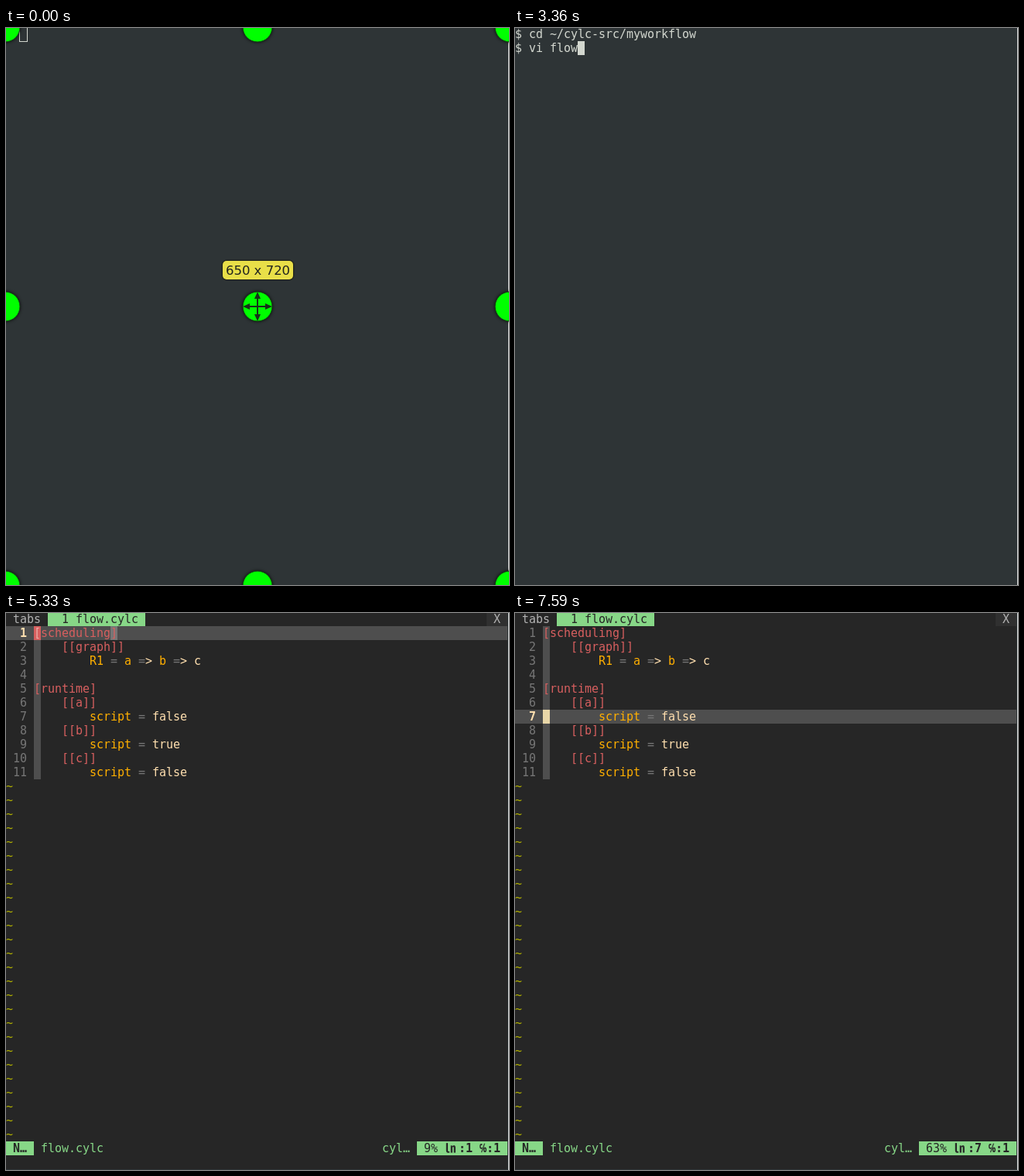
Write an HTML page with a canvas that moves like this. It is 650 px wide and 720 px high and loops after 8 s.

```html
<!DOCTYPE html>
<html>
<head>
<meta charset="utf-8">
<style>
html, body { margin: 0; width: 100%; height: 100%; overflow: hidden; background: #2e3436; }
canvas { display: block; }
</style>
</head>
<body>
<canvas id="stage" width="650" height="720"></canvas>
<script>
const ctx = document.getElementById('stage').getContext('2d');
const LOOP = 8000, CELL_W = 9, CELL_H = 18;
const TERM = '#2e3436', TERM_FG = '#d3d7cf';
const BG = '#262626', BAR = '#4e4e4e', GREEN = '#87d787', GREY = '#767676';
const RED = '#d75f5f', ORANGE = '#ffaf00', CREAM = '#ffdfaf', CURSOR = '#e8d6a8';
const CD = 'cd ~/cylc-src/myworkflow', EDIT = 'vi flow.cylc';
const SOURCE = [
  '[scheduling]',
  '    [[graph]]',
  '        R1 = a => b => c',
  '',
  '[runtime]',
  '    [[a]]',
  '        script = false',
  '    [[b]]',
  '        script = true',
  '    [[c]]',
  '        script = false'
];
const KEY_TIMES = [...Array.from({ length: 7 }, (_, i) => 2850 + 85 * i), 3520, 3650, 3900, 3965, 4030];
const MOVE_TIMES = [6290, 6420, 6590, 6710, 6840, 6970];

const passed = (times, t) => times.filter(at => t >= at).length;

function rect(x, y, w, h, color) {
  ctx.fillStyle = color;
  ctx.fillRect(x, y, w, h);
}

function cells(col, row, count, color) {
  rect(col * CELL_W, row * CELL_H - 1, count * CELL_W, CELL_H, color);
}

function text(col, row, str, color, bold = false) {
  ctx.font = `${bold ? 'bold ' : ''}15px "DejaVu Sans Mono", "Noto Sans CJK JP", "Noto Sans CJK", monospace`;
  ctx.textAlign = 'left';
  ctx.textBaseline = 'alphabetic';
  ctx.fillStyle = color;
  [...str].forEach((ch, i) => {
    if (ch !== ' ') ctx.fillText(ch, (col + i) * CELL_W, row * CELL_H + 13);
  });
}

function handle(x, y) {
  ctx.beginPath();
  ctx.arc(x, y, 19, 0, 2 * Math.PI);
  ctx.shadowColor = '#000';
  ctx.shadowBlur = 4;
  ctx.fillStyle = '#00ff00';
  ctx.fill();
  ctx.shadowBlur = 0;
  ctx.lineWidth = 1;
  ctx.strokeStyle = '#124012';
  ctx.stroke();
}

function moveArrows(x, y) {
  ctx.save();
  ctx.translate(x, y);
  for (let i = 0; i < 4; i++) {
    rect(0, -1, 14, 2, '#17301a');
    ctx.beginPath();
    ctx.moveTo(19, 0);
    ctx.lineTo(10, -4);
    ctx.lineTo(10, 4);
    ctx.fill();
    ctx.rotate(Math.PI / 2);
  }
  ctx.restore();
}

function resizeOverlay(alpha) {
  ctx.globalAlpha = alpha;
  for (const x of [-1, 325, 651])
    for (const y of [-1, 360, 721]) handle(x, y);
  moveArrows(325, 360);
  ctx.beginPath();
  ctx.roundRect(280, 301, 91, 24, 5);
  ctx.lineWidth = 3;
  ctx.strokeStyle = '#22251f';
  ctx.stroke();
  ctx.fillStyle = '#e9df48';
  ctx.fill();
  ctx.font = '16.5px "DejaVu Sans", sans-serif';
  ctx.textAlign = 'center';
  ctx.fillStyle = '#22251f';
  ctx.fillText('650 x 720', 325.5, 319);
  ctx.globalAlpha = 1;
}

function prompt(row, typed, focused = true) {
  text(0, row, '$ ' + typed, TERM_FG);
  if (focused) return cells(2 + typed.length, row, 1, TERM_FG);
  ctx.lineWidth = 1;
  ctx.strokeStyle = TERM_FG;
  ctx.strokeRect(17.5, -1.5, 10, 19);
}

function shell(t) {
  if (t >= 4200) {
    if (t >= 4360) cells(0, 0, 1, TERM_FG);
  } else if (t >= 2140) {
    text(0, 0, '$ ' + CD, TERM_FG);
    prompt(1, EDIT.slice(0, passed(KEY_TIMES, t)));
  } else {
    prompt(0, t < 1470 ? '' : t < 1510 ? CD.slice(0, 12) : CD, t >= 760);
    const faded = passed([80, 120, 170, 210], t);
    if (faded < 4) resizeOverlay(1 - faded / 4);
  }
}

function tokenColor(token) {
  if (token[0] === '[') return RED;
  if (token === '=') return GREY;
  return /^(>|c|true|false)$/.test(token) ? CREAM : ORANGE;
}

function codeLine(line, row, current) {
  if (current) cells(0, row, 72, BAR);
  cells(4, row, 1, BAR);
  text(0, row, String(row).padStart(3), current ? CREAM : GREY, current);
  const section = line[0] === '[';
  if (current) {
    cells(4, row, 1, section ? RED : CURSOR);
    if (section) cells(3 + line.length, row, 1, GREY);
  }
  for (const m of line.matchAll(/\[+\w+\]+|\w+|[=>]/g))
    text(4 + m.index, row, m[0], tokenColor(m[0]));
  if (current && section) text(4, row, '[', '#e8b0a8');
}

function statusBar(line) {
  const percent = ` ${Math.floor(100 * line / SOURCE.length)}% `;
  const start = 63 - percent.length;
  cells(0, 38, 4, GREEN);
  text(1, 38, 'N…', BG, true);
  text(5, 38, 'flow.cylc', GREEN);
  text(start - 5, 38, 'cyl…', GREEN);
  cells(start, 38, 72 - start, GREEN);
  text(start, 38, percent, BG);
  text(63, 38, '㏑', BG, true);
  text(65, 38, `:${line} ℅:1`, BG, true);
}

function editor(t) {
  const current = 1 + passed(MOVE_TIMES, t);
  rect(0, 0, 648, 719, BG);
  text(1, 0, 'tabs', '#b2b2b2');
  cells(6, 0, 14, GREEN);
  text(8, 0, '1 flow.cylc', BG);
  cells(69, 0, 3, '#303030');
  text(70, 0, 'X', '#b2b2b2');
  SOURCE.forEach((line, i) => codeLine(line, i + 1, i + 1 === current));
  for (let row = 12; row < 38; row++) text(0, row, '~', '#afaf00');
  statusBar(current);
}

function draw(now) {
  const t = now % LOOP;
  rect(0, 0, 650, 720, TERM);
  rect(649, 0, 1, 720, '#e4e5e4');
  if (t < 4530) shell(t);
  else editor(t);
  requestAnimationFrame(() => draw(performance.now()));
}
draw(performance.now());
</script>
</body>
</html>
```
